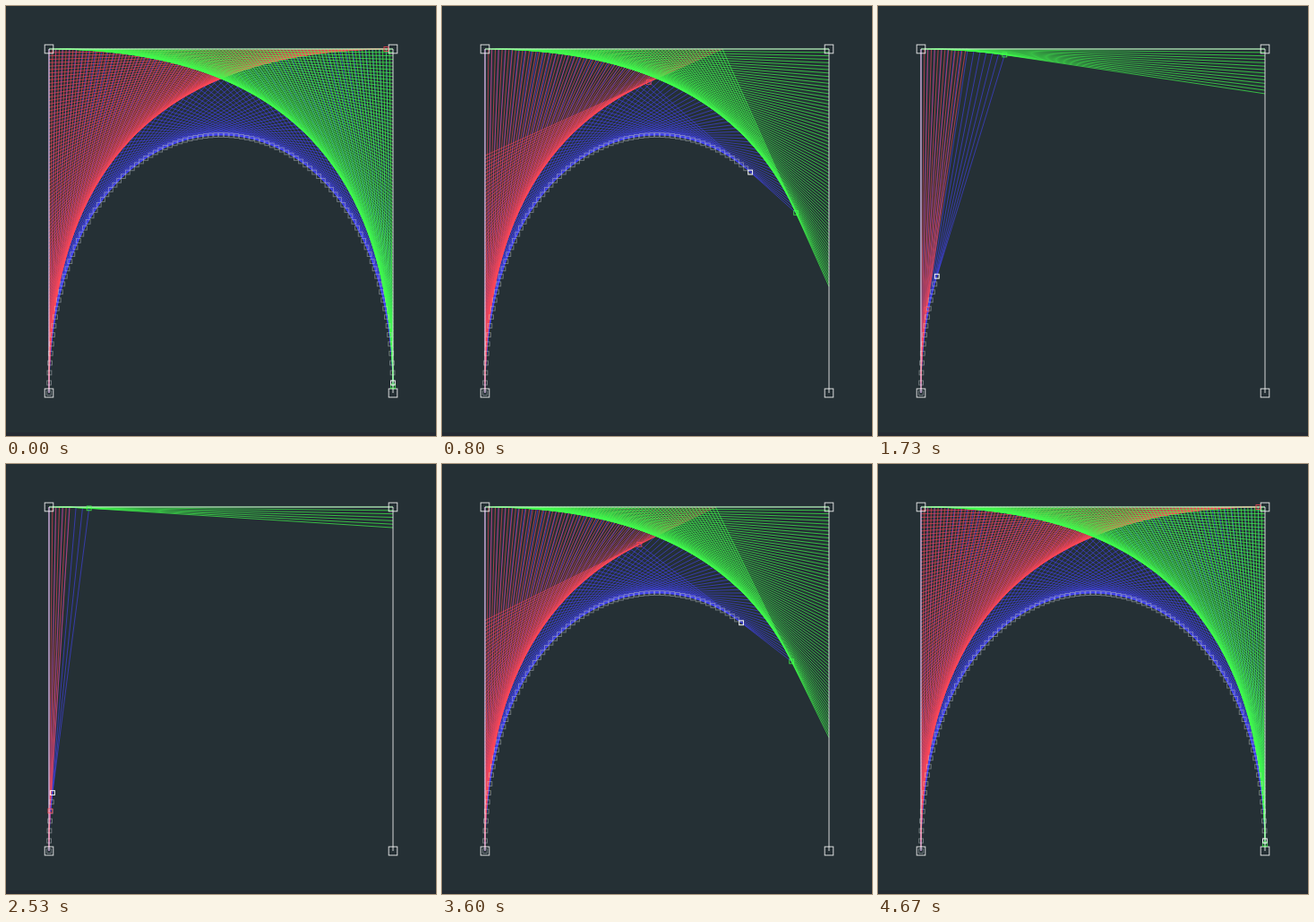
An HTML page with a canvas that plays this animation: 480 px wide and 480 px high, repeating every 4740 ms.

```html
<!DOCTYPE html>
<html lang="en">
<head>
<meta charset="utf-8">
<title>Bézier construction</title>
<style>
  html, body { margin: 0; width: 100%; height: 100%; overflow: hidden; background: #253035; }
  canvas { display: block; width: 480px; height: 480px; }
</style>
</head>
<body>
<canvas id="stage" width="480" height="480"></canvas>
<script>
const ctx = document.getElementById('stage').getContext('2d');
const LOOP = 4740, FRAMES = 71, STEPS = 100;
const LOW = 48, HIGH = 432;
const corners = [[LOW, HIGH], [LOW, LOW], [HIGH, LOW], [HIGH, HIGH]];

// Progress of the construction: [tick, percent of the curve]
const keys = [[-4, 99], [0, 99], [8, 81], [12, 69], [26, 13], [33, 0], [35, 0],
  [38, 6], [48, 38], [54, 67], [59, 83], [67, 99], [71, 99], [79, 81]];

const mix = (a, b, t) => a.map((v, i) => v + (b[i] - v) * t);
const reduce = (points, t) => points.slice(1).map((p, i) => mix(points[i], p, t));

// All levels of de Casteljau's scheme for each step
const levels = Array.from({ length: STEPS + 1 }, (_, i) => {
  const t = i / STEPS;
  const edge = reduce(corners, t);
  const inner = reduce(edge, t);
  return { edge, inner, point: reduce(inner, t)[0] };
});

function progress(tick) {
  let i = 1;
  while (tick >= keys[i + 1][0]) i++;
  const slope = j => (keys[j + 1][1] - keys[j - 1][1]) / (keys[j + 1][0] - keys[j - 1][0]);
  const [x0, y0] = keys[i], [x1, y1] = keys[i + 1];
  const span = x1 - x0, u = (tick - x0) / span, v = 1 - u;
  const y = y0 * (1 + 2 * u) * v * v + y1 * u * u * (3 - 2 * u)
    + span * u * v * (slope(i) * v - slope(i + 1) * u);
  return Math.round(Math.min(99, Math.max(0, y)));
}

function line(points, color) {
  ctx.strokeStyle = color;
  ctx.beginPath();
  points.forEach(p => ctx.lineTo(...p));
  ctx.stroke();
}

function square([x, y], size, color) {
  ctx.strokeStyle = color;
  ctx.strokeRect(x - size / 2, y - size / 2, size, size);
}

function draw(count) {
  ctx.fillStyle = '#253035';
  ctx.fillRect(0, 0, 480, 480);
  ctx.fillStyle = '#242a32';
  ctx.fillRect(0, 476, 480, 4);
  ctx.lineWidth = 0.96;

  const drawn = levels.slice(0, count + 1);
  drawn.forEach(l => {
    line(l.edge.slice(0, 2), 'rgba(255,72,88,.64)');
    line(l.inner, 'rgba(68,68,255,.6)');
  });
  drawn.forEach(l => line(l.edge.slice(1), 'rgba(64,255,76,.7)'));
  drawn.forEach(l => square(l.point, 4.8, 'rgba(190,195,200,.5)'));

  line(corners, 'rgba(255,255,255,.85)');
  corners.forEach(p => square(p, 9.6, 'rgba(255,255,255,.85)'));

  const { inner, point } = levels[count];
  square(inner[0], 4.8, 'rgba(255,72,88,.8)');
  square(inner[1], 4.8, 'rgba(64,255,76,.8)');
  square(point, 4.8, 'rgba(255,255,255,.9)');
}

let shown = -1;
function play(now) {
  // 15 ticks a second, on a 10 ms clock
  const clock = Math.floor((now % LOOP) / 10);
  const tick = Math.min(FRAMES - 1, Math.floor((clock + 0.5) * 0.15));
  if (tick !== shown) draw(progress(shown = tick));
  requestAnimationFrame(play);
}
play(performance.now());
</script>
</body>
</html>
```
